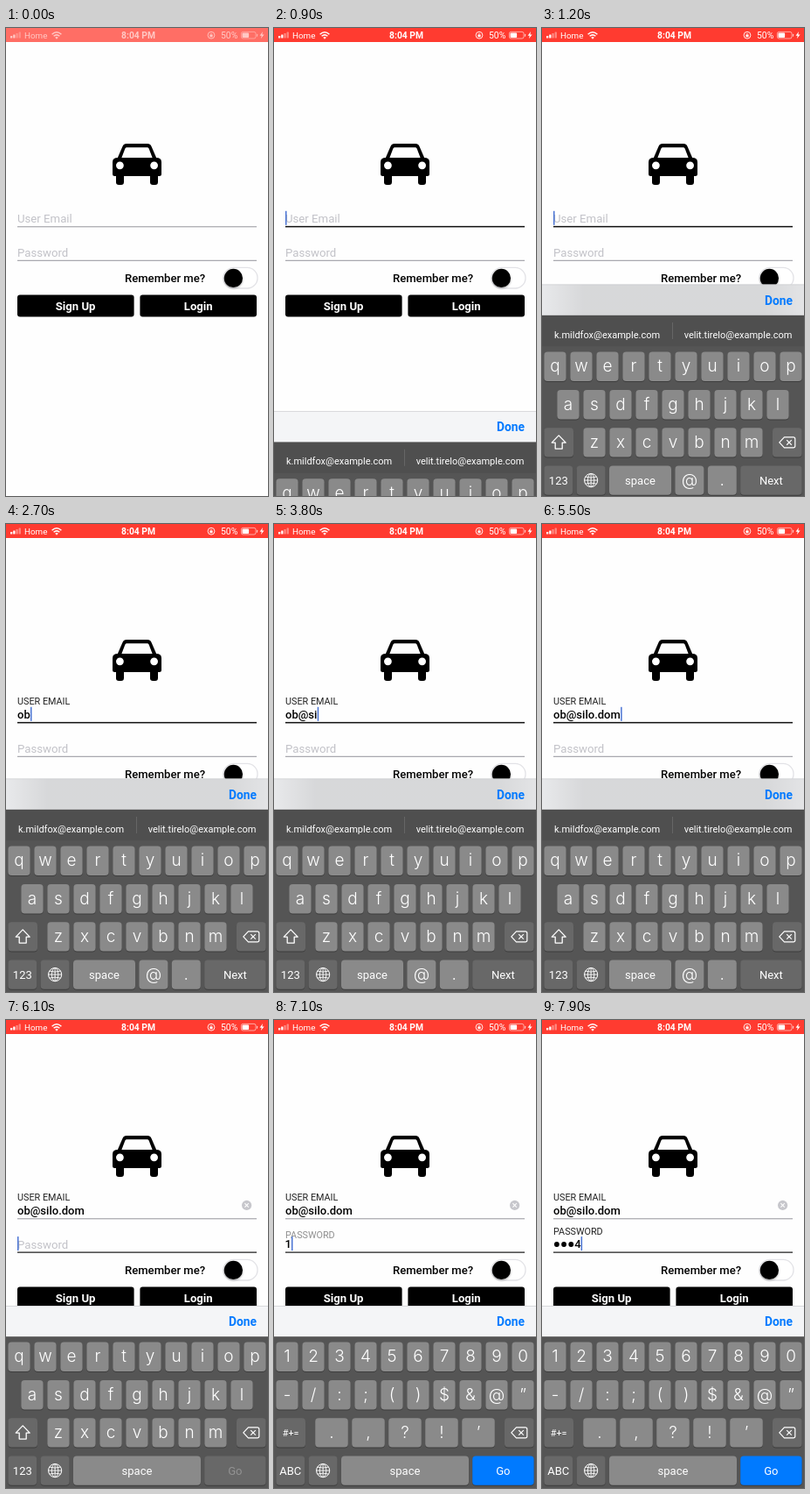
These frames come from a looping animation (300x534 px, 8 s). An HTML page:

```html
<!DOCTYPE html>
<html lang="en">
<head>
<meta charset="utf-8">
<title>Login form</title>
<style>
  html, body { margin: 0; width: 100%; height: 100%; overflow: hidden; background: #fff; }
  svg { display: block; width: 300px; height: 534px; }
  text { font-family: Roboto, sans-serif; white-space: pre; }
  .glyph { font-family: Inter, sans-serif; font-weight: 300; }
</style>
</head>
<body>
<svg id="stage" viewBox="0 0 300 534" xmlns="http://www.w3.org/2000/svg"></svg>
<script>
const LOOP = 8000, STEP = 100;
const KEY_H = 33.4, ROWS = [367.6, 411, 454.2, 497.4];
const MAIL = 'ob@silo.dom', PASS = '1234';
const HINTS = ['k.mildfox@example.com', 'velit.tirelo@example.com'];
// Moments at which each key goes down; the character lands one step later.
const MAIL_DOWN = [1900, 2200, 2800, 3500, 3700, 4000, 4200, 4600, 4900, 5200, 5400];
const PASS_DOWN = [6900, 7200, 7500, 7800];
const FOCUS = 900, NEXT = 5900, SWITCH = 6000, NUMERIC = 6700;

const stage = document.getElementById('stage');
const pen = document.createElement('canvas').getContext('2d');
const clamp = (v, a = 0, b = 1) => Math.min(b, Math.max(a, v));
const mix = (a, b, p) => a + (b - a) * p;
const esc = s => s.replace(/&/g, '&amp;').replace(/</g, '&lt;');

function text(s, x, y, size, fill, o = {}) {
  return `<text x="${x}" y="${y}" font-size="${size}" fill="${fill}"` +
    ` font-weight="${o.weight || 400}" text-anchor="${o.anchor || 'start'}"` +
    ` opacity="${o.opacity ?? 1}" class="${o.cls || ''}">${esc(s)}</text>`;
}
function rect(x, y, w, h, fill, r = 0, extra = '') {
  return `<rect x="${x}" y="${y}" width="${w}" height="${h}" rx="${r}" fill="${fill}" ${extra}/>`;
}
function circle(x, y, r, fill, extra = '') {
  return `<circle cx="${x}" cy="${y}" r="${r}" fill="${fill}" ${extra}/>`;
}
function line(d, color, w = 1, extra = '') {
  return `<path d="${d}" fill="none" stroke="${color}" stroke-width="${w}" ${extra}/>`;
}
function textWidth(s) {
  pen.font = '500 13px Roboto, sans-serif';
  return pen.measureText(s).width;
}

const DEFS = `<defs>
  <linearGradient id="shade">
    <stop offset="0" stop-opacity=".05"/><stop offset=".16" stop-opacity=".12"/>
    <stop offset=".85" stop-opacity=".12"/><stop offset="1" stop-opacity=".07"/>
  </linearGradient>
  <filter id="soft" x="-30%" y="-30%" width="160%" height="160%">
    <feDropShadow dx="0" dy="1" stdDeviation="1.3" flood-opacity=".35"/>
  </filter></defs>`;

function statusBar(t) {
  const p = clamp(t / 200), w = '#fff';
  const bg = `rgb(255,${mix(110, 59, p)},${mix(101, 48, p)})`;
  let s = '';
  for (let i = 0; i < 4; i++) {
    const h = 2.5 + i * 1.5;
    s += rect(5 + i * 3.2, 11.6 - h, 2.3, h, w, 0.5, i > 1 ? 'opacity=".4"' : '');
  }
  s += text('Home', 21, 12, 9.8, w);
  s += line('M52.6 7.2Q58 2.4 63.4 7.2M54.6 9.3Q58 6.4 61.4 9.3', w, 1.5);
  s += `<path d="M56.2 10.7Q58 9.2 59.8 10.7L58 12.7Z" fill="#fff"/>`;
  s += text('8:04 PM', 151.5, 12, 10.3, w, { anchor: 'middle', weight: 600 });
  s += circle(235, 8.2, 3.9, 'none', 'stroke="#fff" stroke-width=".9"');
  s += rect(233.4, 7.7, 3.2, 2.5, w, 0.4) + line('M234.1 8V6.9Q235 5.5 235.9 6.9V8', w, 0.6);
  s += text('50%', 246, 12, 10.4, w);
  s += rect(269.4, 4.4, 16.6, 7.6, 'none', 2, 'stroke="#fff" stroke-width=".8" stroke-opacity=".7"');
  s += rect(270.5, 5.5, 7.6, 5.4, w, 1) + rect(287, 6.7, 1.1, 3, w, 0.5, 'opacity=".7"');
  s += `<path d="M294 4L290.6 8.7H292.8L291.8 12.3L295.6 7.5H293.3Z" fill="#fff"/>`;
  return rect(0, 0, 300, 16, bg) + `<g opacity="${mix(0.62, 1, p)}">${s}</g>`;
}

function car() {
  return `<path fill-rule="evenodd" d="M127 150L133.4 135.2Q134.8 132 138 132H162Q165.2 132 166.6 135.2L173 150Z
      M132.4 148H167.6L163.6 137.6Q163 136.2 161.6 136.2H138.4Q137 136.2 136.4 137.6Z"/>
    <path d="M122 153Q122 148 128 148H172Q178 148 178 153V166.5Q178 169 175.5 169H124.5Q122 169 122 166.5Z"/>` +
    rect(126, 164, 9, 15, '#000', 3.2) + rect(165, 164, 9, 15, '#000', 3.2) +
    circle(130.4, 156.8, 4.4, '#fff') + circle(169.6, 156.8, 4.4, '#fff');
}

// A text field whose small title floats up after the first character.
function field(base, hint, title, filled, lift, active, dark) {
  let s = filled ? '' : text(hint, 13, base, 13.2, '#c2c2c8', { weight: 400 });
  if (filled) {
    s += text(title, 13, base - 15.8 + 8 * (1 - lift), 10.8, '#222', { opacity: lift });
  }
  return s + (active ? rect(13, base + 3.9, 274, 1.5, dark) : rect(13, base + 4.3, 274, 1, '#94949c'));
}

function cursor(x, base, opacity) {
  return rect(x, base - 13.2, 1.5, 16, '#4a74d4', 0, `opacity="${opacity}"`);
}

function count(downs, t) {
  return downs.filter(d => t >= d + STEP).length;
}

function blink(t) {
  if (t >= 1300 && t < 1900) return clamp((1600 - t) / 400);
  return t >= 5700 && t < NEXT ? 0 : 1;
}

function form(t) {
  const n = count(MAIL_DOWN, t), k = count(PASS_DOWN, t);
  const onMail = t >= FOCUS && t < SWITCH, onPass = t >= SWITCH;
  let s = field(222, 'User Email', 'USER EMAIL', n, clamp((t - 1900) / 400), onMail, '#111');
  const typed = MAIL.slice(0, n);
  s += text(typed, 13, 221.6, 13, '#000', { weight: 500 });
  if (onMail) s += cursor(n ? 13.3 + textWidth(typed) : 13, 222, blink(t));
  if (onPass) {
    s += circle(275.6, 211.4, 5.6, '#c7c7cc') +
      line('M273.4 209.2L277.8 213.6M277.8 209.2L273.4 213.6', '#fff', 1.1);
  }

  s += field(260.5, 'Password', 'PASSWORD', k, clamp((t - 6900) / 400), onPass, '#444');
  for (let i = 0; i < k - 1; i++) s += circle(16.9 + i * 8.2, 256, 2.9, '#000');
  let x = 13;
  if (k) {
    x += (k - 1) * 8.2;
    s += text(PASS[k - 1], x - 0.4, 260.3, 13, '#000', { weight: 500 });
    x += 7;
  }
  if (onPass) s += cursor(x, 260.3, 1);

  s += text('Remember me?', 136, 289.6, 13.1, '#000', { weight: 500 });
  s += rect(249, 273.4, 39, 23.6, '#fff', 11.8, 'stroke="#e2e2e6" stroke-width="1.3"');
  s += circle(260.4, 285.4, 10.6, '#000', 'filter="url(#soft)"');
  s += rect(13, 304.4, 133.6, 25, '#000', 3) + rect(153.4, 304.4, 133.6, 25, '#000', 3);
  const label = { anchor: 'middle', weight: 700 };
  return s + text('Sign Up', 79.6, 322, 13.1, '#fff', label) +
    text('Login', 220.2, 322, 13.1, '#fff', label);
}

function keys(t) {
  const list = [];
  const add = (label, x, row, w, kind = 'char') => list.push({ label, x, y: ROWS[row], w, kind });
  const run = (chars, x, row, w = 25.2, pitch = 30) =>
    [...chars].forEach((c, i) => add(c, x + i * pitch, row, w));
  const numeric = t >= NUMERIC, pass = t >= SWITCH;
  if (numeric) {
    run('1234567890', 2.4, 0);
    run('-/:;()$&@”', 2.4, 1);
    run('.,?!’', 47.2, 2, 37.6, 42);
    add('#+=', 2.4, 2, 33.6, 'small');
  } else {
    run('qwertyuiop', 2.4, 0);
    run('asdfghjkl', 17.4, 1);
    run('zxcvbnm', 47.4, 2);
    add('shift', 2.4, 2, 33.6, 'icon');
  }
  add('back', 264, 2, 33.6, 'icon');
  add(numeric ? 'ABC' : '123', 2.4, 3, 32.8, 'word');
  add('globe', 39.6, 3, 33, 'icon');
  add('space', 77, 3, pass ? 146 : 71, 'space');
  if (!pass) {
    add('@', 152.4, 3, 33);
    add('.', 189.8, 3, 33);
  }
  add(pass ? 'Go' : 'Next', 227.2, 3, 70.4, 'word');
  return list;
}

const ICONS = {
  shift: line('M0 -8L8 .2H4V7.2H-4V.2H-8Z', '#fff', 1.3, 'stroke-linejoin="round"'),
  back: line('M-9 0L-3.4 -6H7Q9 -6 9 -4V4Q9 6 7 6H-3.4ZM-.6 -2.8L5 2.8M5 -2.8L-.6 2.8', '#fff', 1.2,
    'stroke-linejoin="round"'),
  globe: circle(0, 0, 7.6, 'none', 'stroke="#fff"') +
    '<ellipse rx="3.7" ry="7.6" fill="none" stroke="#fff" stroke-width=".9"/>' +
    line('M0 -7.6V7.6M-7.6 0H7.6M-6.2 -4Q0 -2 6.2 -4M-6.2 4Q0 2 6.2 4', '#fff', 0.9)
};

function drawKey(k, t) {
  const cx = k.x + k.w / 2, cy = k.y + KEY_H / 2, mid = { anchor: 'middle' };
  const light = k.kind === 'char' || k.kind === 'space';
  const pressed = (k.label === 'Next' && t >= NEXT) || (k.label === '123' && t >= 6600);
  const ready = k.label === 'Go' && count(PASS_DOWN, t) > 0;
  const fill = ready ? '#007aff' : light || pressed ? '#8a8a8a' : '#686868';
  let s = rect(k.x, k.y + 1, k.w, KEY_H, '#3d3d3d', 4) + rect(k.x, k.y, k.w, KEY_H, fill, 4);
  if (k.kind === 'icon') {
    s += `<g transform="translate(${cx} ${cy})">${ICONS[k.label]}</g>`;
  } else if (k.kind === 'char') {
    s += text(k.label, cx, cy + 6, 19, '#fff', { ...mid, cls: 'glyph' });
  } else {
    const dim = k.label === 'Go' && !ready;
    s += text(k.label, cx, cy + 4.4, k.kind === 'small' ? 10.8 : 13, dim ? '#929292' : '#fff', mid);
  }
  return s;
}

function popup(k) {
  const w = k.w + 21, x = clamp(k.x - 10.5, 1, 299 - w), r = x + w;
  const top = k.y - 52, neck = k.y - 12, foot = k.y + KEY_H, kx = k.x, kr = k.x + k.w;
  const d = `M${x + 7} ${top}H${r - 7}Q${r} ${top} ${r} ${top + 7}V${neck - 6}
    C${r} ${neck + 6} ${kr} ${neck + 4} ${kr} ${k.y + 4}V${foot - 4}Q${kr} ${foot} ${kr - 4} ${foot}
    H${kx + 4}Q${kx} ${foot} ${kx} ${foot - 4}V${k.y + 4}
    C${kx} ${neck + 4} ${x} ${neck + 6} ${x} ${neck - 6}V${top + 7}Q${x} ${top} ${x + 7} ${top}Z`;
  return `<path d="${d}" fill="#636363" filter="url(#soft)"/>` +
    text(k.label, x + w / 2, k.y - 21, 27, '#fff', { anchor: 'middle', cls: 'glyph' });
}

function heldChar(t) {
  const held = d => t >= d && t < d + STEP;
  const i = MAIL_DOWN.findIndex(held), j = PASS_DOWN.findIndex(held);
  return i >= 0 ? MAIL[i] : j >= 0 ? PASS[j] : null;
}

function keyboard(t) {
  // Critically damped spring slides the whole panel in.
  const q = 18.3 * Math.max(0, t - 825) / 1000;
  if (!q) return '';
  const slide = 244 * (1 + q) * Math.exp(-q);
  const drop = clamp((t - NEXT) / 200), top = mix(290.6, 326, drop);
  const shade = clamp((326 - top - slide) / 30);
  let s = rect(0, top, 300, 362 - top, '#f4f5f7');
  s += rect(0, top, 300, 35.4, 'url(#shade)', 0, `opacity="${shade}"`);
  s += rect(0, top, 300, 0.6, '#c6c7cb');
  s += text('Done', 287, top + 23, 13.8, '#007aff',
    { anchor: 'end', weight: 600, cls: 'done' });
  s += rect(0, top + 35.2, 300, 534 - top, '#555');
  if (t < SWITCH) {
    s += rect(0, 326, 300, 35.2, '#4f4f4f') + rect(149, 334, 0.8, 19, '#6c6c6c');
    s += text(HINTS[0], 74.5, 351.6, 11, '#fff', { anchor: 'middle' });
    s += text(HINTS[1], 224.5, 351.6, 11, '#fff', { anchor: 'middle' });
  }
  const list = keys(t), held = heldChar(t);
  s += list.map(k => drawKey(k, t)).join('');
  const down = held && list.find(k => k.label === held);
  if (down) s += popup(down);
  return `<g transform="translate(0 ${slide})">${s}</g>`;
}

function draw(t) {
  stage.innerHTML = DEFS + rect(0, 0, 300, 534, '#fefefe') +
    car() + form(t) + keyboard(t) + statusBar(t);
}

const start = performance.now();
let shown = -1;
function tick() {
  const t = Math.floor(((performance.now() - start) % LOOP) / STEP) * STEP;
  if (t !== shown) draw(shown = t);
  requestAnimationFrame(tick);
}
tick();
</script>
</body>
</html>
```
